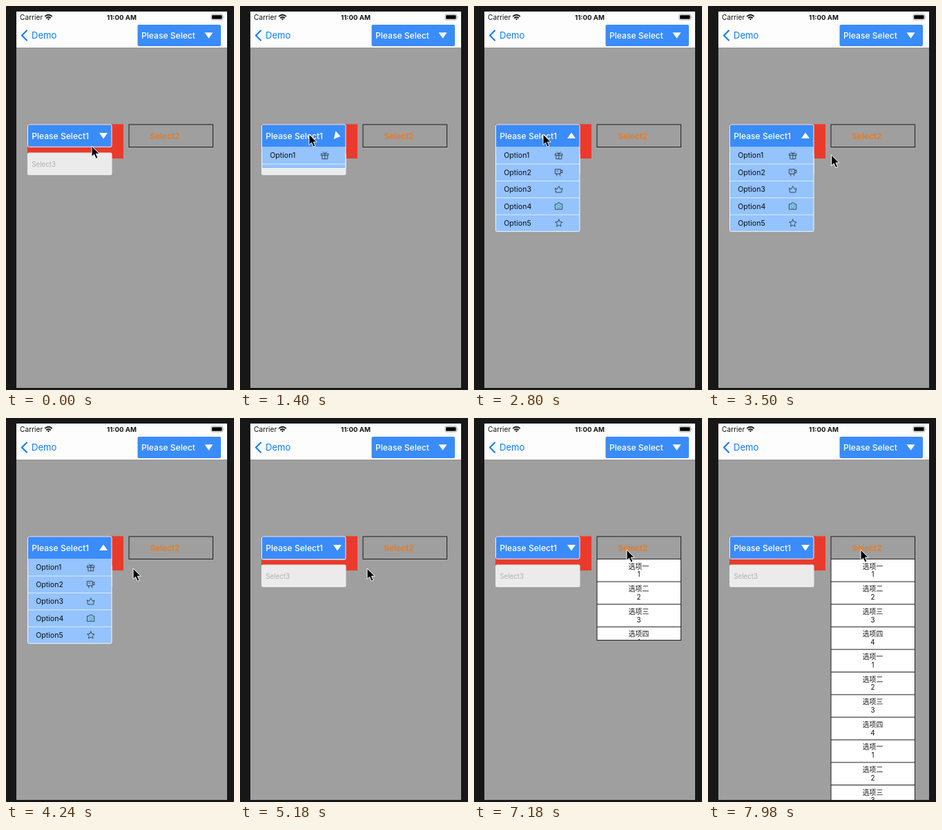
An HTML page for the animation above (8 s loop, 330 by 554 pixels).

```html
<!DOCTYPE html>
<html lang="en">
<head>
<meta charset="utf-8">
<title>Dropdown demo</title>
<style>
  html, body { margin: 0; width: 100%; height: 100%; overflow: hidden; background: #171717; }
  svg { display: block; width: 100%; height: 100%; }
  text { font-family: Inter, Roboto, "Noto Sans CJK SC", "Noto Sans CJK", sans-serif; }
  .mid { text-anchor: middle; }
  .title { font-size: 12.1px; font-weight: 500; fill: #fff; }
  .option { font-size: 10.6px; fill: #0b0f14; }
  .row { font-size: 9.8px; fill: #111; text-anchor: middle; }
  .icon { fill: none; stroke: #2d3a48; stroke-width: .9; stroke-linejoin: round; stroke-linecap: round; }
</style>
</head>
<body>
<svg viewBox="0 0 330 554" xmlns="http://www.w3.org/2000/svg">
  <defs>
    <clipPath id="screen"><rect x="15" y="8" width="305" height="543"/></clipPath>
    <clipPath id="clip1"><rect id="clip1Box" x="31" y="203" width="122.5" height="0"/></clipPath>
    <clipPath id="clip2"><rect id="clip2Box" x="177" y="203" width="124" height="0"/></clipPath>
    <path id="tri" d="M-6-4H6L0 4.5Z" fill="#fff"/>
  </defs>
  <rect width="330" height="554" fill="#171717"/>
  <g clip-path="url(#screen)">
    <rect x="15" y="8" width="305" height="543" fill="#9f9f9f"/>
    <rect x="15" y="8" width="305" height="52" fill="#fdfdfd"/>
    <rect x="15" y="60" width="305" height=".6" fill="#8a8a8a"/>

    <text x="20" y="20" font-size="10.2" fill="#111">Carrier</text>
    <g fill="none" stroke="#111" stroke-width="1.8">
      <path d="M56.2 15.2Q61.5 10.4 66.8 15.2"/>
      <path d="M58.2 17.5Q61.5 14.6 64.8 17.5"/>
    </g>
    <path d="M59.8 18.6Q61.5 17.2 63.2 18.6L61.5 20.4Z" fill="#111"/>
    <text class="mid" x="167.5" y="20" font-size="9.6" font-weight="700" fill="#111">11:00 AM</text>
    <rect x="296.8" y="12" width="17" height="8" rx="2.2" fill="none" stroke="#999" stroke-width=".8"/>
    <rect x="298" y="13.2" width="14.6" height="5.6" rx="1.2" fill="#000"/>
    <path d="M314.9 14.6Q316.4 16 314.9 17.4Z" fill="#999"/>

    <path d="M30 35.5L23 42.5L30 49.5" fill="none" stroke="#0a7aff" stroke-width="2.1" stroke-linecap="round" stroke-linejoin="round"/>
    <text x="37" y="47.2" font-size="13.1" fill="#0a7aff">Demo</text>

    <rect x="190.5" y="27" width="120.5" height="31" rx="2" fill="#3a8cfb"/>
    <text class="title" x="196" y="47">Please Select</text>
    <use href="#tri" x="293.5" y="42.2"/>

    <rect x="31" y="170.5" width="139" height="49.5" fill="#e93b2b"/>
    <rect x="31" y="211.5" width="122.5" height="32.5" rx="2.5" fill="#ebebeb"/>
    <text x="37.2" y="231.6" font-size="9.8" fill="#b0b0b0">Select3</text>

    <g clip-path="url(#clip2)">
      <rect x="178" y="203" width="121.5" height="360" fill="#fff"/>
      <g id="rows"></g>
    </g>
    <rect id="frame2" x="178" y="171" width="121.5" height="32.5" fill="none" stroke="#1d1d1d"/>
    <path d="M178 203.5H299.5" stroke="#1d1d1d"/>
    <text class="mid" x="229.8" y="191.6" font-size="11.8" font-weight="600" fill="#e87b22">Select2</text>

    <rect x="31.5" y="171" width="121.5" height="32.3" rx="2" fill="#3a8cfb"/>
    <g clip-path="url(#clip1)">
      <rect x="31.5" y="203" width="121.5" height="123" fill="#94c3fd"/>
      <g id="options"></g>
    </g>
    <rect id="frame1" x="31.5" y="171" width="121.5" height="32.3" rx="2" fill="none" stroke="#fff" stroke-width=".9"/>
    <text class="title" x="37.2" y="191.6">Please Select1</text>
    <use id="arrow" href="#tri"/>
  </g>
  <path id="cursor" d="M0 0V15.4L3.6 12.2L6.2 18.3L9 17.1L6.4 11.2H11.2Z" fill="#000" stroke="#fff" stroke-width="1" stroke-linejoin="round"/>
</svg>
<script>
const LOOP = 8000, TOP = 203, LIST1 = 122, LIST2 = 348, ROW1 = 24.4, ROW2 = 32.6;
const $ = id => document.getElementById(id);

// Icons are centred on the origin.
const icons = [
  '<path d="M-5-2.5H5V0H-5ZM-4 0V5H4V0M0-2.5V5M-2.5-5L0-2.5L2.5-5"/>',
  '<path d="M-5-4.5H2.5V2H-5ZM2.5-2L5-3.5V1L2.5 0M-3 2V5M1 2L2 5M-3-2H-1"/>',
  '<path d="M-5-1.5L-2.5 0L0-4.5L2.5 0L5-1.5L3.8 4.5H-3.8Z"/>',
  '<path d="M-5-3H-2.5L-1.5-4.8H1.5L2.5-3H5V4.5H-5Z"/><circle cy=".7" r="2.3" stroke="#2fae8c"/>',
  '<path d="M0-5.2L1.6-1.8L5.2-1.4L2.5 1.1L3.2 4.8L0 3L-3.2 4.8L-2.5 1.1L-5.2-1.4L-1.6-1.8Z"/>'
];

$('options').innerHTML = icons.map((icon, i) => {
  const y = TOP + i * ROW1;
  const line = i < 4 ? `<path d="M32 ${y + ROW1 + .6}H153" stroke="#e4f0ff" stroke-width=".9"/>` : '';
  return `<text class="option" x="43.2" y="${y + 16.4}">Option${i + 1}</text>
    <g class="icon" transform="translate(122.8 ${y + 12.6})">${icon}</g>${line}`;
}).join('');

$('rows').innerHTML = Array.from({ length: 11 }, (_, i) => {
  const y = TOP + i * ROW2, n = i % 4;
  return `<text class="row" x="238.5" y="${y + 14.6}">选项${'一二三四'[n]}</text>
    <text class="row" x="238.5" y="${y + 26.3}">${n + 1}</text>
    <path d="M178 ${y + ROW2 + .5}H299.5" stroke="#1d1d1d"/>`;
}).join('');

const clamp = v => Math.max(0, Math.min(1, v));
const ease = v => { v = clamp(v); return v * v * (3 - 2 * v); };

// Critically damped spring from 0 to 1, t in ms.
function spring(t, w = 10.6) {
  if (t <= 0) return 0;
  if (t > 800) return 1;
  const k = w * t / 1000;
  return 1 - Math.exp(-k) * (1 + k);
}

// Pointer moves: start, end, x, y
const home = [124, 202];
const moves = [
  [0, 180, 104, 190],
  [400, 560, 100, 185],
  [2960, 3600, 184, 217],
  [5400, 6020, 221, 190]
];

function pointer(t) {
  let [x, y] = home;
  for (const [a, b, tx, ty] of moves) {
    const k = ease((t - a) / (b - a));
    x += (tx - x) * k;
    y += (ty - y) * k;
  }
  return `translate(${x} ${y})`;
}

function draw(t) {
  const open = spring(t - 1309) - spring(t - 4520);
  const turn = ease((t - 1311) / 200) - ease((t - 4520) / 200);
  const h1 = LIST1 * open, h2 = LIST2 * spring(t - 7068);
  $('clip1Box').setAttribute('height', h1);
  $('frame1').setAttribute('height', 32.3 + h1);
  $('clip2Box').setAttribute('height', h2);
  $('frame2').setAttribute('height', 32.5 + h2);
  $('arrow').setAttribute('transform', `translate(141 187) rotate(${-180 * turn})`);
  $('cursor').setAttribute('transform', pointer(t));
}

const start = performance.now();
function tick() {
  draw((performance.now() - start) % LOOP);
  requestAnimationFrame(tick);
}
tick();
</script>
</body>
</html>
```
